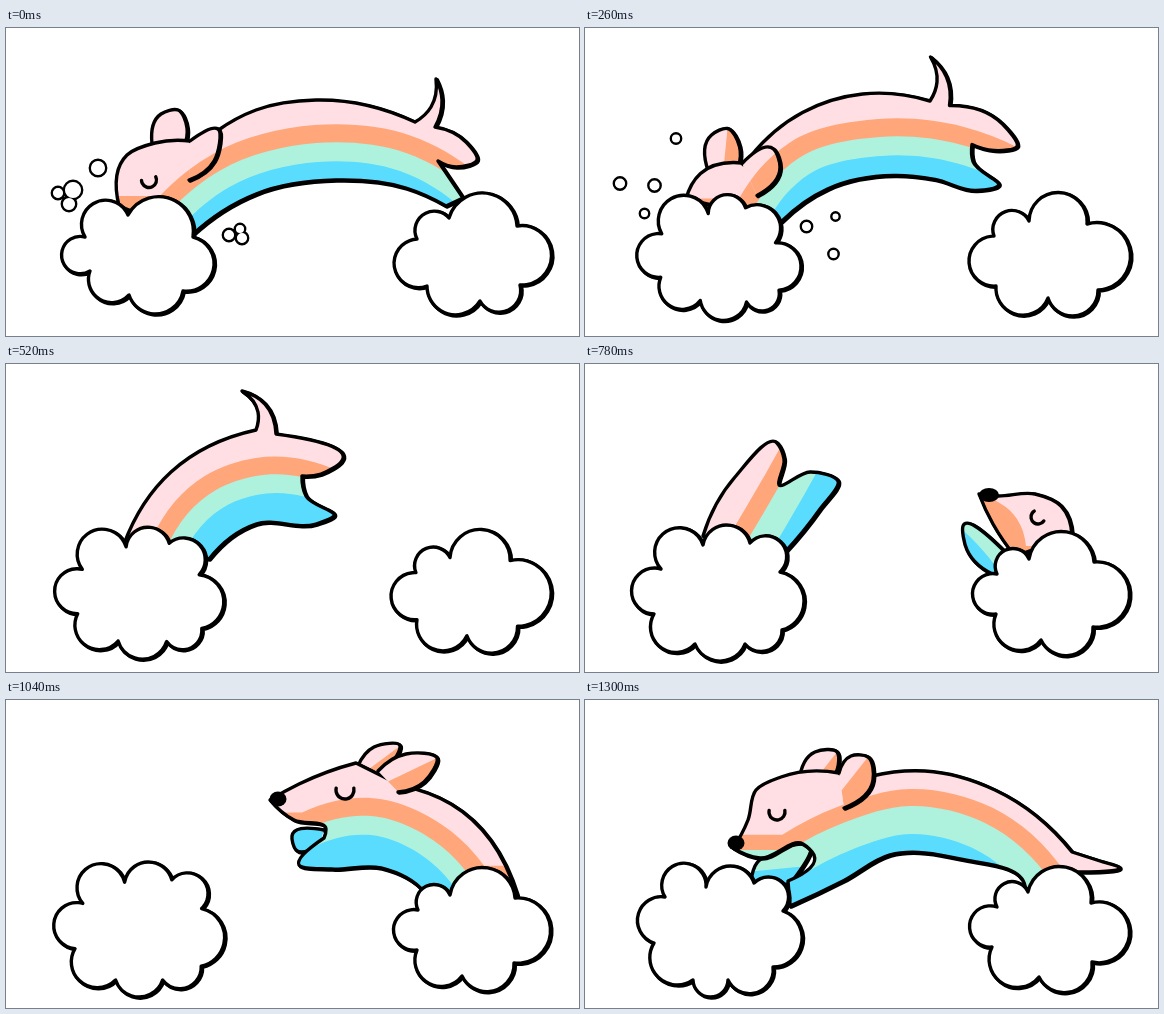
Animation, 573 px wide and 308 px high, one loop 1.43 s. Source, as an HTML page with a canvas:

```html
<!DOCTYPE html>
<html lang="en">
<head>
<meta charset="utf-8">
<title>Rainbow dog</title>
<style>
  html, body { margin: 0; width: 100%; height: 100%; overflow: hidden; background: #fff; }
  canvas { display: block; width: 573px; height: 308px; }
</style>
</head>
<body>
<canvas id="stage" width="573" height="308"></canvas>
<script>
const STEP = 130, W = 573, H = 308;
const COLORS = ['#ffdfe3', '#ffa77a', '#aef2de', '#5adcff'];
const PINK = 0, ORANGE = 1, MINT = 2, BLUE = 3;
const ctx = document.getElementById('stage').getContext('2d');
ctx.lineCap = ctx.lineJoin = 'round';

// Outlines are "x y x y | x y": smooth runs of points with a corner at each bar.
// Stripes are parallel to one rim line, each at its own offset from it.
const shape = (base, outline, rim = '', offsets = []) =>
  ({ kind: 'shape', base, outline, rim, offsets });
const body = (outline, rim, up = -18, down = 19) => shape(PINK, outline, rim, [up, 0, down]);
const flap = (outline, base = PINK) => ({ kind: 'flap', base, outline });
const plain = (outline, base = PINK) => ({ kind: 'plain', base, outline });
const overlap = (outline, rim) => ({ kind: 'overlap', base: PINK, outline, rim, offsets: [-18] });
const nose = (x, y, rx = 8.5, ry = 7.5) => ({ kind: 'nose', x, y, rx, ry });
const eye = (x, y, r, turn = 0) => ({ kind: 'eye', x, y, r, turn });

// Clouds list "x y bulge" for each lobe, clockwise.
const leftStart = '79 209 26 122 187 29 187 209 26 177 263 21 123 267 19 84 243 26';
const leftDive = '77 206 28 125 187 15 159 180 18 189 217 24 193 261 15 162 272 20 117 270 19 78 249 24';
const leftWide = '76 205 30 118 181 19 165 179 22 195 208 23 197 266 14 160 280 17 110 280 23 69 250 26';
const leftEnd = '80 197 29 121 187 19 169 183 20 198 211 24 188 267 20 143 280 17 108 280 22 69 243 22';
const rightStart = '411 211 17 443 190 29 511 198 33 514 257 19 474 273 21 421 258 28';
const rightDive = '409 208 18 444 193 30 502 196 38 513 262 22 463 270 23 411 258 26';
const rightRise = '412 210 18 444 195 29 509 198 36 508 263 22 456 276 23 411 250 24';
const rightEnd = '412 207 18 443 192 31 506 203 38 507 262 23 454 277 25 407 247 25';

const rimA = '165 182 215 142 310 115 400 125 470 168';
const diveA = [
  plain('146 116 155 86 172 82 181 100 178 118'),
  body('113 178 121 127 149 115 184 113 | 211 103 | 250 82 310 72 409 94 | 425 79 430 51 | 436 72 429 99 | 460 114 471 132 450 139 432 133 | 457 170 | 440 178 | 400 160 330 152 250 166 186 207 | 113 178', rimA),
  overlap('184 113 212 101 208 133 183 152', rimA),
  eye(143, 152, 7.5, -0.25)
];

const rimB = '170 180 203 138 290 112 380 121 450 150';
const diveB = [
  flap('134 134 144 95 163 90 170 109 166 126'),
  body('101 172 116 138 171 121 | 187 110 | 240 82 300 71 374 82 | 387 62 386 33 | 397 58 394 88 | 440 108 453 130 430 130 409 127 | 413 140 436 163 414 166 365 154 320 150 250 163 190 200 | 101 172', rimB),
  overlap('171 121 200 110 203 131 178 161', rimB)
];

const rimC = '165 185 225 122 300 106 370 112 420 132';
const diveC = [
  flap('113 154 109 119 122 111 139 128 141 150'),
  body('101 170 115 153 143 149 | 144 147 | 195 87 255 61 316 64 | 317 46 305 25 | 326 40 335 67 | 395 84 411 107 388 115 365 106 | 363 127 391 152 368 159 335 149 298 145 235 159 203 187 | 101 170', rimC),
  overlap('143 150 177 132 187 147 166 174', rimC)
];

const sinkA = [
  body('118 180 165 108 250 66 | 252 48 236 27 | 259 40 270 70 | 335 98 315 110 296 112 | 300 132 328 152 310 160 250 160 203 195 | 118 180', '160 185 210 126 250 112 330 125')
];
const sinkB = [
  body('117 178 155 110 200 77 | 195 58 178 42 | 205 54 215 74 | 259 97 250 107 234 109 | 240 124 278 143 255 157 220 168 202 190 | 117 178', '160 180 200 133 280 110')
];

const riseA = [
  body('118 172 150 113 192 79 199 95 194 121 225 108 253 117 235 145 200 188 | 118 172', '160 180 178 150 215 85', -18, 26),
  shape(MINT, '412 212 382 186 378 162 420 188 | 412 212', '374 163 392 180 414 207', [0]),
  shape(PINK, '394 130 408 160 430 192 | 487 172 | 476 142 450 130 411 132 394 130', '394 131 432 155 441 182', [0]),
  nose(404, 131, 10, 7),
  eye(453, 153, 7, 0.8)
];
const riseB = [
  flap('114 184 133 141 148 131 152 148 140 187'),
  flap('168 188 184 164 204 157 206 180 195 202', MINT),
  plain('366 137 338 126 352 116 368 132', BLUE),
  body('343 96 352 115 368 134 | 345 137 333 150 375 165 420 196 | 505 215 | 511 190 478 146 | 492 131 460 105 420 83 378 87 343 96', '350 122 395 140 442 157 462 190', -26),
  plain('491 131 480 147 455 150 425 139', ORANGE),
  nose(351, 89, 12, 8),
  eye(408, 102, 8, 0.2)
];
const riseC = [
  flap('352 66 368 47 394 46 388 60 374 72'),
  plain('318 130 286 136 290 150 314 143', BLUE),
  body('264 100 293 84 350 63 | 396 86 | 445 104 511 195 | 430 215 | 418 192 375 168 325 169 293 165 318 138 | 320 129 288 120 264 100', '300 130 365 116 435 146 465 178'),
  flap('372 71 400 54 431 58 418 82 392 92'),
  nose(272, 99),
  eye(339, 90, 9)
];
const riseD = [
  flap('293 66 300 36 320 28 326 44 319 66'),
  shape(MINT, '258 139 216 139 208 149 230 160 256 142 | 258 139', '207 137 246 158', [0]),
  body('204 124 235 103 266 72 316 69 | 332 62 | 348 87 | 412 94 472 134 511 195 | 430 215 | 413 189 330 154 284 164 245 185 236 170 258 143 | 260 137 225 139 204 124', '230 139 290 121 340 111 440 147 480 190', -16, 21),
  flap('316 69 335 42 366 35 364 65 345 88'),
  nose(211, 125),
  eye(277, 97, 10)
];
const riseE = [
  flap('214 82 230 52 252 52 252 70 243 82'),
  shape(MINT, '166 187 170 166 226 146 205 184 | 166 187', '160 172 212 167', [0]),
  body('148 148 163 120 171 90 196 77 254 73 | 270 66 | 287 76 | 340 71 410 90 487 152 | 515 161 534 167 494 172 | 440 200 | 440 186 375 159 305 155 258 181 205 206 | 203 181 | 229 155 218 144 175 158 148 148', '205 150 258 123 325 106 400 123 468 184', -17, 28),
  flap('254 73 266 56 283 57 288 80 259 108'),
  nose(151, 143),
  eye(192, 112, 8)
];

// Puffs list "x y radius"; touching ones merge.
const puffsA = '92 140 8 52 165 6 67 162 9 63 176 7 223 207 6 234 201 5 236 210 6';
const puffsB = '88 121 6 45 162 8 69 166 8 65 180 6 220 204 6 240 192 4 242 219 6';
const puffsC = '94 100 4 25 149 4 70 149 4 54 191 3 223 193 5 261 185 4 255 233 4';

// Blends two values of the same structure, down to the numbers inside strings.
function mix(a, b, t = 0.5) {
  if (typeof a === 'number') return a + (b - a) * t;
  if (typeof a === 'string') {
    const to = b.match(/\d+/g);
    return a.replace(/\d+/g, n => mix(+n, +to.shift(), t));
  }
  if (Array.isArray(a)) return a.map((v, i) => mix(v, b[i], t));
  return Object.fromEntries(Object.keys(a).map(k => [k, mix(a[k], b[k], t)]));
}
const left = t => mix(leftDive, leftWide, t);
const right = t => mix(rightDive, rightRise, t);

// Each pose: parts, left cloud, right cloud, puffs.
const poses = [
  [diveA, leftStart, rightStart, puffsA],
  [diveB, leftDive, rightDive, puffsB],
  [mix(diveB, diveC), left(0.25), right(0), mix(puffsB, puffsC)],
  [diveC, left(0.5), right(0), puffsC + ' 463 129 6'],
  [sinkA, left(0.7), right(0.3)],
  [sinkB, left(0.85), right(0.6)],
  [riseA, leftWide, rightRise],
  [riseB, left(1.2), rightRise],
  [riseC, mix(leftWide, leftEnd, 0.2), rightRise],
  [riseD, mix(leftWide, leftEnd, 0.4), rightRise],
  [riseE, leftEnd, rightEnd]
];

function tuples(text, size) {
  const n = text.trim().split(/\s+/).map(Number);
  return Array.from({ length: n.length / size }, (_, i) => n.slice(i * size, i * size + size));
}

// Adds a smooth run whose tangents are weighted by the spacing of its points.
function addRun(path, p) {
  const last = p.length - 1;
  const d = [], s = [], m = [];
  for (let i = 0; i < last; i++) {
    const dx = p[i + 1][0] - p[i][0], dy = p[i + 1][1] - p[i][1];
    d[i] = Math.hypot(dx, dy) || 1;
    s[i] = [dx / d[i], dy / d[i]];
  }
  for (let i = 1; i < last; i++)
    m[i] = [0, 1].map(k => (s[i - 1][k] * d[i] + s[i][k] * d[i - 1]) / (d[i - 1] + d[i]));
  m[0] = last > 1 ? [0, 1].map(k => 2 * s[0][k] - m[1][k]) : s[0];
  m[last] = last > 1 ? [0, 1].map(k => 2 * s[last - 1][k] - m[last - 1][k]) : s[0];
  for (let i = 0; i < last; i++) {
    const [a, b] = [p[i], p[i + 1]], r = d[i] / 3;
    path.bezierCurveTo(a[0] + m[i][0] * r, a[1] + m[i][1] * r,
      b[0] - m[i + 1][0] * r, b[1] - m[i + 1][1] * r, b[0], b[1]);
  }
}

function curve(text) {
  const path = new Path2D();
  let pen;
  for (const run of text.split('|')) {
    const p = tuples(run, 2);
    if (pen) p.unshift(pen);
    else path.moveTo(...p[0]);
    if (p.length > 1) addRun(path, p);
    pen = p[p.length - 1];
  }
  return path;
}

function stripe(rim, offset) {
  const p = tuples(rim, 2);
  const q = p.map(([x, y], i) => {
    const a = p[Math.max(i - 1, 0)], b = p[Math.min(i + 1, p.length - 1)];
    const dx = b[0] - a[0], dy = b[1] - a[1], k = offset / Math.hypot(dx, dy);
    return [x - dy * k, y + dx * k];
  });
  const path = new Path2D();
  path.moveTo(0, q[0][1]);
  path.lineTo(...q[0]);
  addRun(path, q);
  path.lineTo(W, q[q.length - 1][1]);
  path.lineTo(W, H);
  path.lineTo(0, H);
  return path;
}

// The second half of a flap, from its tip to its base.
function shade(outline) {
  const p = tuples(outline, 2), end = p[p.length - 1];
  const path = new Path2D();
  path.moveTo(...p[p.length >> 1]);
  path.lineTo((p[0][0] + end[0]) / 2, (p[0][1] + end[1]) / 2);
  path.lineTo(...end);
  path.lineTo(end[0] + 40, end[1]);
  path.lineTo(p[p.length >> 1][0] + 40, p[p.length >> 1][1] - 20);
  return path;
}

function stroke(path, width = 3.4) {
  ctx.lineWidth = width;
  ctx.stroke(path);
}

// A shifted stroke under the fill makes the lower right side heavier.
function solid(path, color, paintInside) {
  ctx.save();
  ctx.translate(1.2, 0.9);
  stroke(path, 3.8);
  ctx.restore();
  ctx.fillStyle = color;
  ctx.fill(path);
  if (paintInside) {
    ctx.save();
    ctx.clip(path);
    paintInside();
    ctx.restore();
  }
  stroke(path);
}

function drawPart({ kind, base, outline, rim, offsets, x, y, rx, ry, r, turn }) {
  const path = outline ? curve(outline) : new Path2D();
  if (kind === 'nose') {
    path.ellipse(x, y, rx, ry, 0, 0, 7);
    ctx.fillStyle = '#000';
    ctx.fill(path);
  } else if (kind === 'eye') {
    path.arc(x, y, r, turn - 0.2, turn + Math.PI + 0.2);
    stroke(path);
  } else {
    if (kind === 'shape') path.closePath();
    solid(path, COLORS[base], () => {
      ctx.fillStyle = COLORS[base + 1];
      if (kind === 'flap') ctx.fill(shade(outline));
      (offsets || []).forEach((offset, i) => {
        ctx.fillStyle = COLORS[base + i + 1];
        ctx.fill(stripe(rim, offset));
      });
    });
  }
}

function drawCloud(text) {
  const lobes = tuples(text, 3), path = new Path2D();
  lobes.forEach(([x, y, bulge], i) => {
    const [x2, y2] = lobes[(i + 1) % lobes.length];
    const dx = x2 - x, dy = y2 - y, chord = Math.hypot(dx, dy);
    const radius = (chord * chord / 4 + bulge * bulge) / (2 * bulge);
    const k = (bulge - radius) / chord;
    const cx = (x + x2) / 2 + dy * k, cy = (y + y2) / 2 - dx * k;
    path.arc(cx, cy, radius, Math.atan2(y - cy, x - cx), Math.atan2(y2 - cy, x2 - cx));
  });
  path.closePath();
  solid(path, '#fff');
}

function drawPuffs(text) {
  const path = new Path2D(), inside = new Path2D();
  for (const [x, y, r] of tuples(text, 3)) {
    path.moveTo(x + r, y);
    path.arc(x, y, r, 0, 7);
    inside.moveTo(x + r - 1, y);
    inside.arc(x, y, r - 1, 0, 7);
  }
  stroke(path, 2.8);
  ctx.fillStyle = '#fff';
  ctx.fill(inside);
}

let shown = -1;
function tick(now) {
  const i = Math.floor(now / STEP) % poses.length;
  if (i !== shown) {
    shown = i;
    const [parts, leftCloud, rightCloud, puffs] = poses[i];
    ctx.fillStyle = '#fff';
    ctx.fillRect(0, 0, W, H);
    parts.forEach(drawPart);
    drawCloud(leftCloud);
    drawCloud(rightCloud);
    if (puffs) drawPuffs(puffs);
  }
  requestAnimationFrame(tick);
}
tick(0);
</script>
</body>
</html>
```
